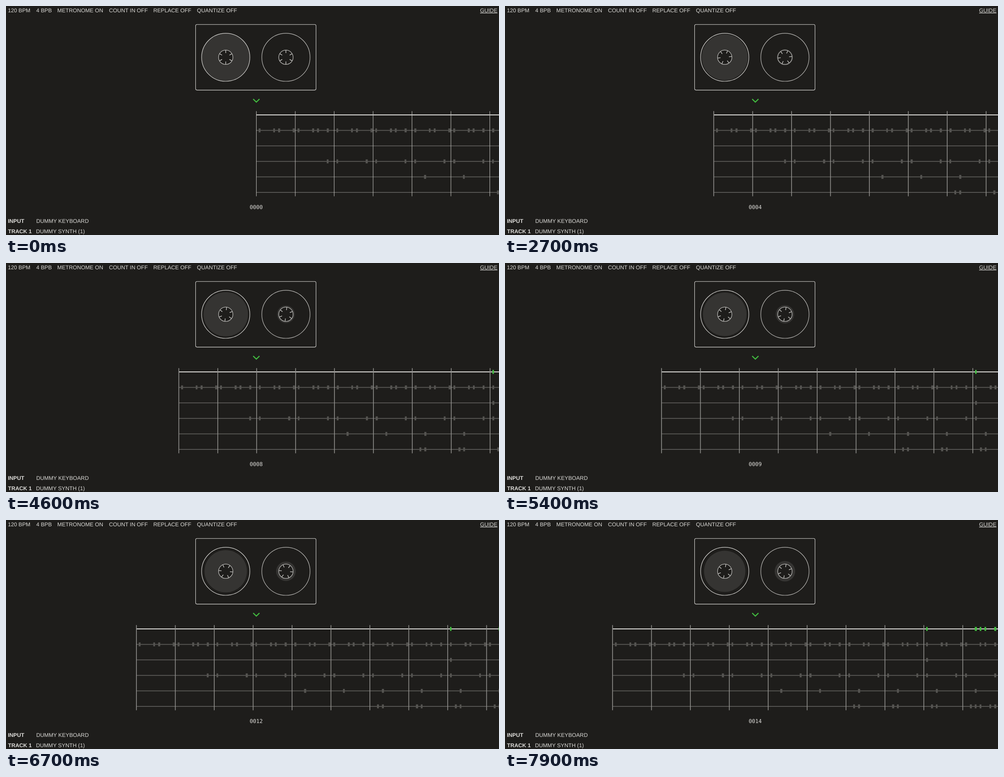
Write an HTML page that moves like this. It is 1096x511 px and loops after 8000 ms.

```html
<!DOCTYPE html>
<html lang="en">
<head>
<meta charset="utf-8">
<title>Tape recorder</title>
<style>
  html, body { margin: 0; width: 100%; height: 100%; overflow: hidden; background: #1e1d1b; }
  svg { display: block; width: 1096px; height: 511px; }
  text { font: 12.17px "Liberation Sans", Arial, sans-serif; fill: #dcdbd8; text-rendering: geometricPrecision; white-space: pre; }
  .bold { font-weight: bold; }
  .link { text-decoration: underline; text-anchor: end; }
  .count { font: 12.05px "DejaVu Sans Mono", monospace; text-anchor: middle; }
  .rest { stroke: #c6c5c2; stroke-width: 1; }
  .rolling { stroke: #92918e; stroke-width: 1.6; }
</style>
</head>
<body>
<svg id="stage" viewBox="0 0 1096 511" xmlns="http://www.w3.org/2000/svg"></svg>
<script>
const LOOP = 8000, STEP = 100, START = 600;
const HEAD_X = 556.6, BAR = 86.5, SIXTEENTH = BAR / 16, BARS = 10;
const TICKS_PER_BEAT = 6, TICK_MS = 1000 / 12, TICK_PX = 3.628;
const GREEN = '#42bd40', INK = '#d6d5d2', SOFT = '#b9b8b5', BG = '#1e1d1b';
const stage = document.getElementById('stage');

function add(parent, tag, attrs, text) {
  const el = document.createElementNS('http://www.w3.org/2000/svg', tag);
  for (const key in attrs) el.setAttribute(key, attrs[key]);
  if (text) el.textContent = text;
  parent.appendChild(el);
  return el;
}

function label(x, y, text, cls = '') {
  return add(stage, 'text', { x, y, class: cls }, text);
}

// Settings and routing labels
label(4.2, 14, '120 BPM');
label(67.3, 14, '4 BPB');
label(114.1, 14, 'METRONOME ON');
label(228.9, 14, 'COUNT IN OFF');
label(327.4, 14, 'REPLACE OFF');
label(424.6, 14, 'QUANTIZE OFF');
label(1092.5, 14, 'GUIDE', 'link');
label(4.2, 484.3, 'INPUT', 'bold');
label(67.3, 484.3, 'DUMMY KEYBOARD');
label(4.6, 507.2, 'TRACK 1', 'bold');
label(66.7, 507.2, 'DUMMY SYNTH (1)');
const counter = label(556.2, 452.5, '0000', 'count');

// Cassette
add(stage, 'rect', { x: 421.5, y: 41.2, width: 267.7, height: 146.4, rx: 3, fill: 'none', stroke: INK, 'stroke-width': 1.1 });

function reel(cx, rim) {
  const g = add(stage, 'g', { transform: `translate(${cx} 114.4)` });
  const tape = add(g, 'circle', { fill: '#353432' });
  add(g, 'circle', { r: 16, fill: BG, stroke: SOFT, 'stroke-width': 1.3 });
  const hub = add(g, 'g', { stroke: INK, 'stroke-width': 1.3 });
  for (let a = 0; a < 360; a += 60) {
    add(hub, 'line', { y1: -15.5, y2: -9.4, transform: `rotate(${a})` });
  }
  add(g, 'circle', { r: 53.6, fill: 'none', stroke: rim, 'stroke-width': 1.2 });
  return { tape, hub };
}
const supply = reel(488.5, INK);
const takeUp = reel(622.3, SOFT);

add(stage, 'path', { d: 'M549.5 207.6L556.5 214.4L563.5 207.6', fill: 'none', stroke: GREEN, 'stroke-width': 2.2 });

// Repeats a pattern of sixteenths from one bar to the end of the tape
function repeat(pattern, from, every = 1) {
  const notes = [];
  for (let bar = from; bar < BARS; bar += every) {
    notes.push(...pattern.map(n => bar * 16 + n));
  }
  return notes;
}

const tracks = [
  [129, 149, 151, 153, 157],
  repeat([1, 7, 9, 15, 17, 23, 25, 29], 0, 2),
  [129],
  repeat([13, 17], 1),
  repeat([5], 4),
  [...repeat([3, 5], 6), 151, 155, 157]
];

let seed = 7;
function random() {
  seed = (seed * 16807) % 2147483647;
  return seed / 2147483647;
}

const roll = add(stage, 'g', {});
tracks.forEach((notes, i) => {
  const y = 243 + i * 34.58;
  add(roll, 'rect', { x: 0, y: y - 0.9, width: 1100, height: 1.8, fill: i ? '#5b5a57' : '#f2f1ee' });
  for (const n of notes) {
    const width = 3.4 + 1.4 * random();
    add(roll, 'rect', { x: n * SIXTEENTH - 0.3, y: y - 4.4, width, height: 8.8, fill: i ? '#555451' : GREEN });
  }
});
const bars = add(roll, 'g', {});
for (let k = 0; k <= BARS; k++) {
  add(bars, 'line', { x1: k * BAR, x2: k * BAR, y1: 234.6, y2: 424.6 });
}

function draw(ms) {
  const t = Math.floor((ms % LOOP) / STEP) * STEP;
  const rolling = t >= START;
  // The tape advances in whole ticks, the hubs turn evenly
  const ticks = rolling ? Math.floor((t - 532) / TICK_MS) : 0;
  const gone = Math.max(0, ticks * TICK_PX - 1.8);
  const turn = rolling ? -0.072 * (t - 530) : 0;
  roll.setAttribute('transform', `translate(${HEAD_X - gone} 0)`);
  bars.setAttribute('class', rolling ? 'rolling' : 'rest');
  supply.tape.setAttribute('r', 53.3 - gone * 0.023);
  takeUp.tape.setAttribute('r', 16 + gone * 0.0215);
  for (const { hub } of [supply, takeUp]) hub.setAttribute('transform', `rotate(${turn})`);
  counter.textContent = String(Math.floor(ticks / TICKS_PER_BEAT)).padStart(4, '0');
}

let begin;
function frame(now) {
  begin ??= now;
  draw(now - begin);
  requestAnimationFrame(frame);
}
draw(0);
requestAnimationFrame(frame);
</script>
</body>
</html>
```
